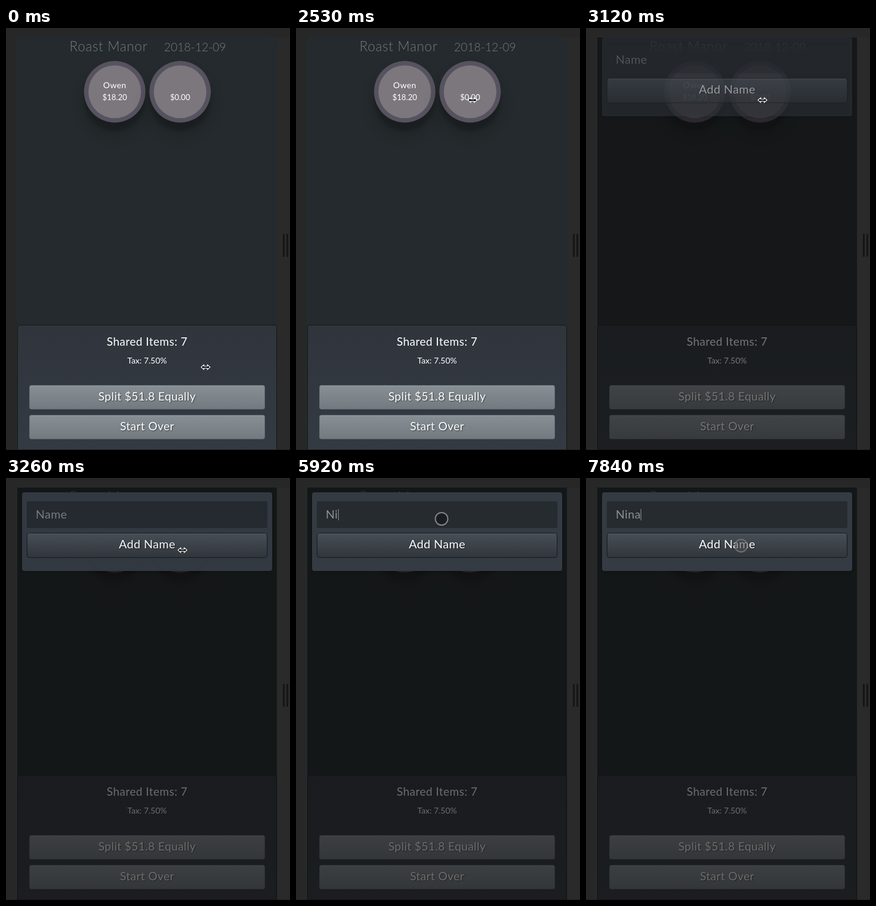
Animation of 478 by 708 pixels, one loop 7.99 s. Source, as an HTML page with a canvas:

```html
<!DOCTYPE html>
<html lang="en">
<head>
<meta charset="utf-8">
<title>Bill splitter</title>
<style>
html, body { margin: 0; width: 100%; height: 100%; overflow: hidden; background: #272727; }
canvas { display: block; }
</style>
</head>
<body>
<canvas id="stage" width="478" height="708"></canvas>
<script>
const ctx = document.getElementById('stage').getContext('2d');
const LOOP = 7990;

// Pointer positions: time, x, y. Each holds until the next.
const POINTER = [
  [0, 336, 569], [150, 339, 590], [300, 335, 608], [440, 318, 605],
  [590, 300, 594], [740, 283, 574], [890, 268, 555], [1040, 260, 540],
  [1190, 287, 525], [1340, 298, 440], [1490, 318, 310], [1630, 334, 209],
  [1930, 316, 150], [2080, 299, 121], [2530, 297, 121],
  [3700, 289, 112], [3850, 275, 97], [4000, 259, 81], [4140, 248, 71],
  [4290, 245, 68.5], [7400, 266, 73], [7550, 299, 89], [7690, 284, 105],
  [7840, 261, 113.5]
];
const TYPED = [[0, ''], [5470, 'N'], [5920, 'Ni'], [6370, 'Nin'], [6510, 'Nina']];
const DIM = [[0, 0], [2970, 0.5], [3120, 0.56], [3260, 0.6]];
const MODAL = [[0, 0], [3120, 0.5], [3260, 0.96], [3410, 1]];
const CARET = [[0, 0], [4290, 1], [4730, 0], [5330, 1], [6960, 0], [7400, 1]];
const PRESSED = [[0, 0], [4290, 1], [5330, 0], [7840, 1]];

function at(track, t) {
  let hit = track[0];
  for (const key of track) if (key[0] <= t) hit = key;
  return hit;
}

function box(x, y, w, h, r, fill, stroke) {
  ctx.beginPath();
  ctx.roundRect(x, y, w, h, r);
  if (fill) { ctx.fillStyle = fill; ctx.fill(); }
  if (stroke) { ctx.strokeStyle = stroke; ctx.lineWidth = 1; ctx.stroke(); }
}

function disc(x, y, r, fill) {
  ctx.beginPath();
  ctx.arc(x, y, r, 0, Math.PI * 2);
  ctx.fillStyle = fill;
  ctx.fill();
}

function fade(y0, y1, top, bottom) {
  const g = ctx.createLinearGradient(0, y0, 0, y1);
  g.addColorStop(0, top);
  g.addColorStop(1, bottom);
  return g;
}

function shadow(color, blur = 0, dx = 0, dy = 0) {
  ctx.shadowColor = color;
  ctx.shadowBlur = blur;
  ctx.shadowOffsetX = dx;
  ctx.shadowOffsetY = dy;
}

function noShadow() { shadow('transparent'); }

function label(str, x, y, size, color, align = 'center', spacing = 0.4, weight = 400) {
  ctx.font = `${weight} ${size}px Lato, "Open Sans", sans-serif`;
  ctx.letterSpacing = spacing + 'px';
  ctx.textAlign = align;
  ctx.fillStyle = color;
  ctx.fillText(str, x, y);
}

function person(x, name, amount) {
  const y = 107;
  shadow('rgba(0,0,0,.2)', 30, 0, 19);
  disc(x, y, 51.5, '#57525f');
  shadow('rgba(0,0,0,.16)', 5, 0, 14);
  disc(x, y, 51.5, '#57525f');
  noShadow();
  disc(x, y, 44.3, '#7b777d');
  label(name, x, 101, 14, '#fff');
  label(amount, x, 121, 13.2, '#fff', 'center', 0);
}

function button(str, y) {
  box(39.5, y + 0.5, 396, 40, 3, fade(y, y + 41, '#889095', '#727a80'), '#5f666b');
  ctx.fillStyle = '#929a9e';
  ctx.fillRect(42, y + 1, 391, 1);
  shadow('rgba(0,0,0,.55)', 2, 1, 1);
  label(str, 237.5, y + 26, 19.2, '#fff');
  noShadow();
}

function page() {
  ctx.fillStyle = '#272727';
  ctx.fillRect(0, 0, 478, 708);
  ctx.fillStyle = '#2a2a2a';
  ctx.fillRect(456, 16, 22, 692);
  box(14, 12, 443, 720, 14, '#262929');
  ctx.fillStyle = '#242a2d';
  ctx.fillRect(19, 16, 437, 692);
  for (const x of [466, 472]) box(x, 345, 3, 39, 1.5, '#161616');

  label('Roast Manor', 107, 39, 22.5, '#747b7e', 'left', 0.7, 300);
  label('2018-12-09', 266, 39, 19.4, '#747b7e', 'left', 0, 300);
  person(183, 'Owen', '$18.20');
  person(293, '', '$0.00');

  box(19.5, 498.5, 436, 225, 3, fade(498, 708, '#30353c', '#343a42'), '#14181a');
  label('Shared Items: 7', 237.5, 533, 19.2, '#fff');
  label('Tax: 7.50%', 237.5, 562.5, 14, '#fff', 'center', 0);
  button('Split $51.8 Equally', 599);
  button('Start Over', 649);
  ctx.fillStyle = '#211f20';
  ctx.fillRect(0, 707, 478, 1);
}

function modal(t, alpha) {
  ctx.save();
  ctx.globalAlpha = alpha;
  if (alpha < 0.9) ctx.translate(0, -8);
  shadow('rgba(0,0,0,.35)', 5, 0, 1);
  box(27, 24, 421, 132, 4, '#353b43');
  noShadow();
  box(35, 39, 405, 45, 3, t < 3410 ? '#25292f' : '#252b2f');

  const typed = at(TYPED, t)[1];
  label(typed || 'Name', 50, 68, 19.8, typed ? '#8b9194' : '#7a8084', 'left');
  if (at(CARET, t)[1]) {
    const x = typed ? 50 + ctx.measureText(typed).width : 49;
    ctx.fillStyle = '#8b9194';
    ctx.fillRect(Math.round(x), 52, 1, 19);
  }

  box(35.5, 92.5, 404, 41, 4, fade(92, 134, '#484f57', '#30353a'), '#15181a');
  ctx.fillStyle = '#555c63';
  ctx.fillRect(38, 93, 399, 1);
  shadow('rgba(0,0,0,.5)', 2, 1, 1);
  label('Add Name', 237.5, 118, 19.8, '#fff');
  ctx.restore();
}

function arrow(x, y) {
  ctx.save();
  ctx.translate(x, y);
  ctx.beginPath();
  for (const s of [-1, 1]) {
    const pts = [[3, 1.5], [3, 4], [7.5, 0], [3, -4], [3, -1.5]];
    for (const [px, py] of pts) ctx.lineTo(s * px, -s * py);
  }
  ctx.closePath();
  ctx.fillStyle = '#000';
  ctx.fill();
  ctx.strokeStyle = '#fff';
  ctx.lineWidth = 1.1;
  ctx.stroke();
  ctx.restore();
}

function touch(x, y, pressed) {
  disc(x, y, 10.5, pressed ? 'rgba(75,77,79,.55)' : 'rgba(10,12,14,.4)');
  ctx.strokeStyle = pressed ? 'rgba(120,122,124,.8)' : '#818587';
  ctx.lineWidth = 2;
  ctx.stroke();
}

function draw(t) {
  page();
  const dim = at(DIM, t)[1];
  if (dim) {
    ctx.fillStyle = `rgba(10,10,10,${dim})`;
    ctx.fillRect(19, 16, 437, 692);
  }
  const open = at(MODAL, t)[1];
  if (open) modal(t, open);
  const [, x, y] = at(POINTER, t);
  if (t < 3700) arrow(x, y);
  else touch(x, y, at(PRESSED, t)[1]);
}

const start = performance.now();
function tick() {
  draw((performance.now() - start) % LOOP);
  requestAnimationFrame(tick);
}
tick();
</script>
</body>
</html>
```
